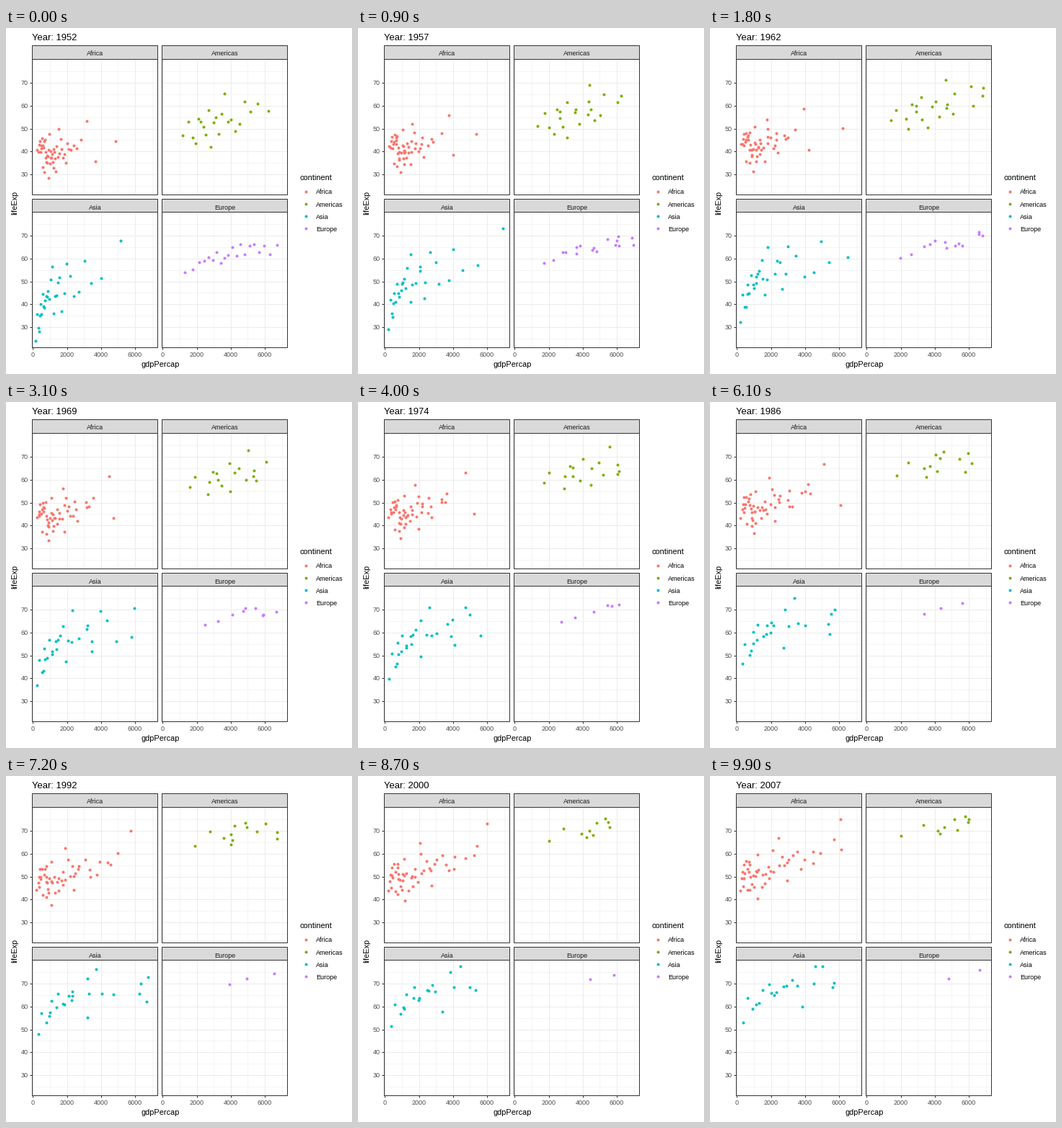
A matplotlib script for the animation above (10000 ms loop, 480 by 480 pixels).

```python
import numpy as np
import matplotlib.pyplot as plt
from matplotlib.animation import FuncAnimation
from matplotlib.patches import Rectangle

SIZE, DPI, FRAMES = 480, 96, 100
PX = 72 / DPI
FIRST, LAST, SURVEYS, STEP = 1952, 2007, 12, 9
INCOME_CAP, LIFE_CAP = 7000, 77.5
DARK, GRID, STRIP = "#333333", "#EBEBEB", "#D9D9D9"

# count, income, growth, life, gain; start and end of spread, slope and noise
MODELS = {
    "Africa": (52, 1080, 0.35, 40, 12, (0.65, 0.95), (2, 6), (4.8, 5.2)),
    "Americas": (25, 3300, 0.95, 54, 15.5, (0.50, 0.62), (11, 6), (5, 2.5)),
    "Asia": (33, 1100, 1.50, 44.5, 18, (0.90, 1.2), (9, 5.5), (5.5, 3.5)),
    "Europe": (30, 5300, 1.50, 64, 12, (0.65, 0.65), (7, 1), (2, 1.5)),
}
COLORS = dict(zip(MODELS, ["#F8766D", "#7CAE00", "#00BFC4", "#C77CFF"]))
# left edge, strip top and panel top
PLACES = {name: (36 + 180 * (n % 2), 24 + 213 * (n // 2), 43 + 212 * (n // 2))
          for n, name in enumerate(MODELS)}


def survey(seed, count, income, growth, life, gain, spread, slope, noise):
    """Income and life expectancy of every dot, one row per survey."""
    rng = np.random.default_rng(seed)
    u = np.linspace(0, 1, SURVEYS)[:, None]
    eased = u ** 0.75

    def blend(ends):
        return ends[0] + (ends[1] - ends[0]) * u

    def walk(sd):
        steps = rng.normal(0, sd, (SURVEYS, count))
        steps[0] = 0
        return steps.cumsum(axis=0)

    rank = (np.arange(count) + 0.5) / count
    z = np.quantile(rng.standard_normal(9999), rank)
    luck = rng.permutation(z)
    log_x = growth * eased + blend(spread) * z + walk(0.04)
    y = life + gain * eased + blend(slope) * log_x + blend(noise) * luck
    return income * np.exp(log_x), np.minimum(y + walk(0.4), LIFE_CAP)


surveys = {name: survey(7 + n, *model)
           for n, (name, model) in enumerate(MODELS.items())}


def positions(name, k):
    """Straight motion between surveys; dots past the cap drop out."""
    x, y = surveys[name]
    a, t = k // STEP, k % STEP / STEP
    b = min(a + 1, SURVEYS - 1)
    seen = (x[a] < INCOME_CAP) & ((x[b] < INCOME_CAP) | (t == 0))
    gdp = x[a] + (x[b] - x[a]) * t
    age = y[a] + (y[b] - y[a]) * t
    left, _, top = PLACES[name]
    xy = np.column_stack([left + 1.4 + 0.0236 * gdp,
                          top + 33.1 + 3.174 * (70 - age)])
    return xy[seen]


fig = plt.figure(figsize=(SIZE / DPI, SIZE / DPI), dpi=DPI, facecolor="white")
ax = fig.add_axes([0, 0, 1, 1])
ax.set(xlim=(0, SIZE), ylim=(SIZE, 0))
ax.axis("off")


def text(x, y, s, size=9, color="black", va="baseline", **kw):
    return ax.text(x, y, s, fontsize=size * PX, color=color,
                   family="Liberation Sans", va=va, **kw)


def line(x0, y0, x1, y1, color=GRID, width=1):
    ax.plot([x0, x1], [y0, y1], color=color, lw=width * PX, zorder=1,
            solid_capstyle="butt")


def box(x0, y0, x1, y1, fill):
    ax.add_patch(Rectangle((x0, y0), x1 - x0, y1 - y0, facecolor=fill,
                           edgecolor=DARK, lw=PX, zorder=4))


def dots(xy, color):
    return ax.scatter(*np.transpose(xy), s=(4 * PX) ** 2, c=color,
                      linewidths=0, antialiased=False, zorder=3)


def panel(name, left, strip, top):
    right, bottom = left + 174, top + 188
    for i in range(8):
        x = int(left + 1.9 + 23.6 * i)
        line(x, top, x, bottom, width=0.55 if i % 2 else 1)
    for i in range(11):
        y = int(top + 17.7 + 15.87 * i)
        line(left, y, right, y, width=1 if i % 2 else 0.55)
    box(left, top, right, bottom, "none")
    box(left, strip, right, top, STRIP)
    text(left + 87.5, strip + 14.5, name, color="#1A1A1A", ha="center",
         zorder=5)


for name, place in PLACES.items():
    panel(name, *place)

for top in (43, 255):
    for i in range(5):
        y = int(top + 33.6 + 31.74 * i)
        line(33, y, 36, y, DARK)
        text(30.5, y + 3, str(70 - 10 * i), color="#4D4D4D", ha="right")
for left in (36, 216):
    for i in range(4):
        x = int(left + 1.9 + 47.2 * i)
        line(x, 443, x, 446, DARK)
        text(x, 456.5, str(2000 * i), color="#4D4D4D", ha="center")

text(214, 470, "gdpPercap", 11, ha="center")
text(12, 242.5, "lifeExp", 11, ha="center", va="center", rotation=90)
text(407, 211, "continent", 11)
for n, (name, color) in enumerate(COLORS.items()):
    y = 226.5 + 17.2 * n
    dots([(415.5, y)], color)
    text(430, y + 4, name)

title = text(36, 17, "", 13)
layers = {name: dots(positions(name, 0), c) for name, c in COLORS.items()}


def update(k):
    title.set_text(f"Year: {round(FIRST + (LAST - FIRST) * k / (FRAMES - 1))}")
    for name, layer in layers.items():
        layer.set_offsets(positions(name, k))
    return [title, *layers.values()]


anim = FuncAnimation(fig, update, frames=FRAMES, interval=100, repeat=True,
                     repeat_delay=0, init_func=lambda: update(0))
plt.show()
```
